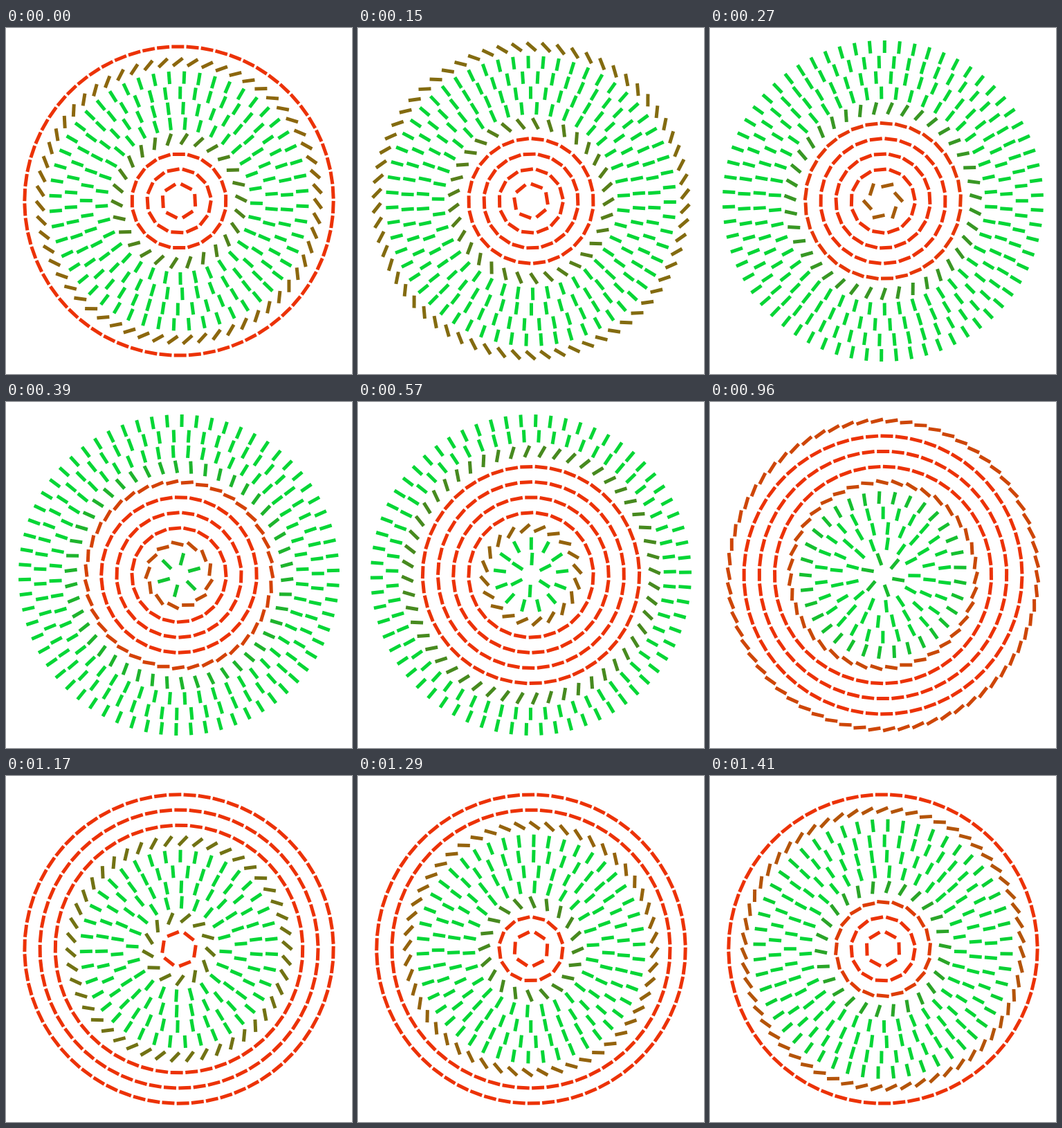
These frames come from a looping animation (500 px wide and 500 px high, 1440 ms). An HTML page with a canvas:

```html
<!DOCTYPE html>
<html lang="en">
<head>
<meta charset="utf-8">
<title>Turning bars</title>
<style>
  html, body { margin: 0; width: 100%; height: 100%; overflow: hidden; background: #fff; }
  canvas { display: block; width: 500px; height: 500px; }
</style>
</head>
<body>
<canvas id="stage" width="500" height="500"></canvas>
<script>
const ctx = document.getElementById('stage').getContext('2d');
const { PI, cos, sin, floor, round, abs, min, max } = Math;

const LOOP = 1440, STEP = 30;
const RINGS = 10, PITCH = 21.2;     // least arc from bar to bar
const LENGTH = 18, WIDTH = 5;
const TURN = 240, REST = 737;       // quarter turn, and time from one to the next

const mix = (a, b, f) => a + (b - a) * f;

const ease = x => {
  x = min(1, max(0, x));
  return x * x * (3 - 2 * x);
};

// Red when tangent (0), green when radial (1), darker in between
function colour(p) {
  const r = mix(236, 6, p);
  const g = mix(50, 214, p) - 30 * sin(PI * p * p);
  const b = mix(6, 54, p * p);
  return `rgb(${[r, g, b].map(round)})`;
}

// Starting shift of a ring, in bars clockwise from the top
const shift = k =>
  0.65 + 0.77 * cos(2 * PI * (k - 4.7) / 9.6) + 0.38 * cos(PI * (k - 1) / 6) ** 8;

function drawRing(k, t) {
  const dir = k % 2 ? -1 : 1;
  const radius = 1 + 22.2 * k;
  const count = floor(2 * PI * radius / PITCH);
  const gap = 2 * PI / count;

  // The wave takes a tenth of the loop from ring to ring
  const u = (t + 107 - LOOP / RINGS * (k + 1) + 2 * LOOP) % LOOP;
  const turn = ease(u / TURN) + ease((u - REST) / TURN);
  const start = -PI / 2 + gap * (shift(k) + dir * t / LOOP);

  ctx.fillStyle = colour(1 - abs(1 - turn));
  for (let i = 0; i < count; i++) {
    ctx.save();
    ctx.translate(250, 250);
    ctx.rotate(start + i * gap);
    ctx.translate(radius, 0);
    ctx.rotate(PI / 2 * (1 + dir * turn));
    ctx.fillRect(-LENGTH / 2, -WIDTH / 2, LENGTH, WIDTH);
    ctx.restore();
  }
}

function draw(now) {
  const t = floor((now % LOOP) / STEP) * STEP;
  ctx.fillStyle = '#fff';
  ctx.fillRect(0, 0, 500, 500);
  for (let k = 1; k <= RINGS; k++) drawRing(k, t);
}

let begin;
function tick(now) {
  begin ??= now;
  draw(now - begin);
  requestAnimationFrame(tick);
}
draw(0);
requestAnimationFrame(tick);
</script>
</body>
</html>
```
